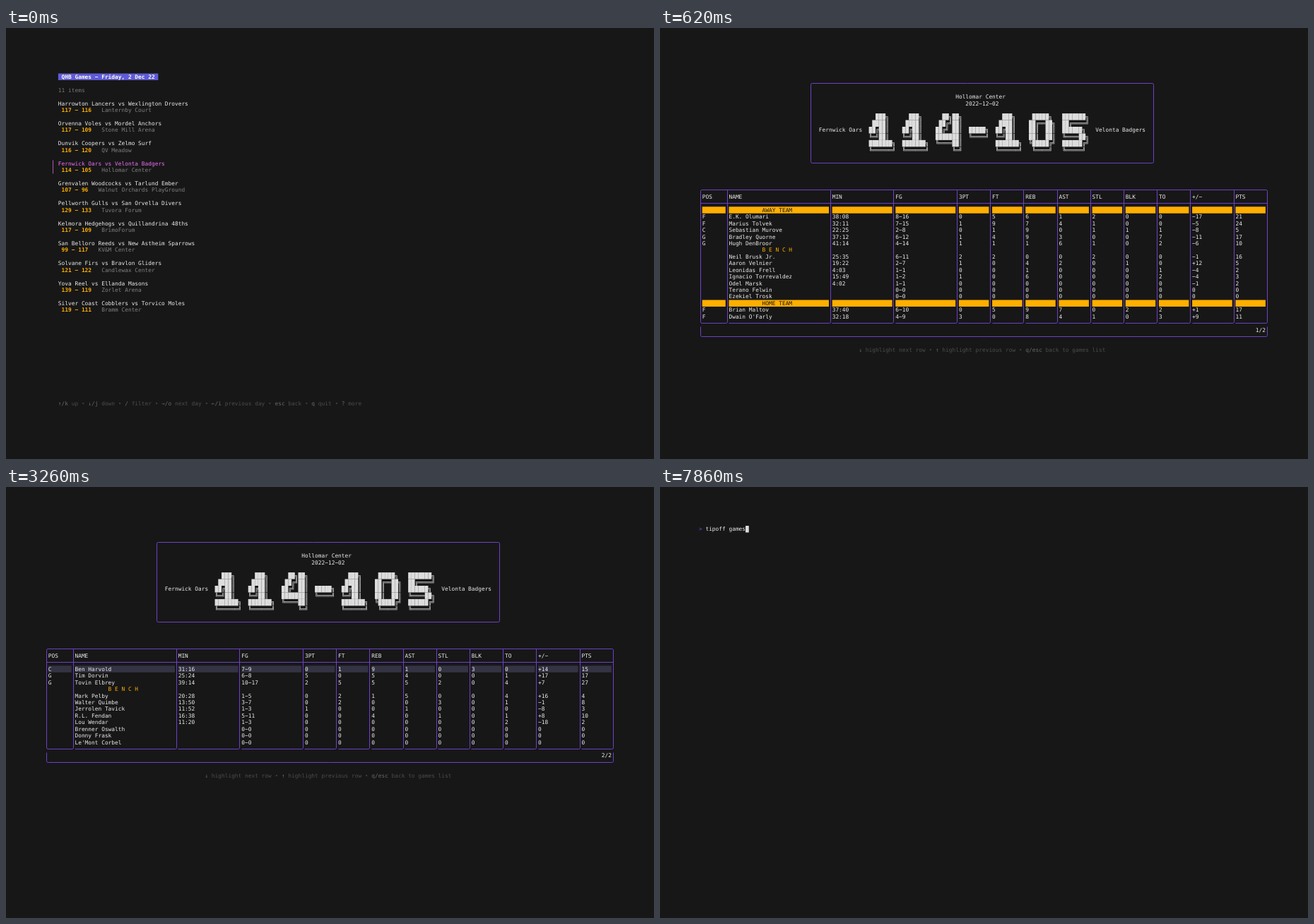
An HTML page with a canvas for the animation above (8000 ms loop, 917 by 611 pixels).

```html
<!DOCTYPE html>
<html lang="en">
<head>
<meta charset="utf-8">
<title>Terminal scoreboard</title>
<style>
html, body { margin: 0; width: 100%; height: 100%; overflow: hidden; background: #171717; }
canvas { display: block; }
</style>
</head>
<body>
<canvas id="stage" width="917" height="611"></canvas>
<script>
const ctx = document.getElementById('stage').getContext('2d');
const LOOP = 8000, ORIGIN = 55, CELL_W = 4.717, CELL_H = 9.444;
const FONT = '7.835px "DejaVu Sans Mono", "Liberation Mono", monospace';
const BG = '#171717', TEXT = '#ececec', LIGHT = '#dddddd', AMBER = '#ffaf00', PURPLE = '#6d41c8';
const KEY = '#686868', HINT = '#4c4c4c', DOT = '#404040';

const games = `Harrowton Lancers vs Wexlington Drovers|117 - 116|Lanternby Court
Orvenna Voles vs Mordel Anchors|117 - 109|Stone Mill Arena
Dunvik Coopers vs Zelmo Surf|116 - 120|QV Meadow
Fernwick Oars vs Velonta Badgers|114 - 105|Hollomar Center
Grenvalen Woodcocks vs Tarlund Ember|107 - 96|Walnut Orchards PlayGround
Pellworth Gulls vs San Orvella Divers|129 - 133|Tuvora Forum
Kelmora Hedgehogs vs Quillandrina 48ths|117 - 109|BrimoForum
San Belloro Reeds vs New Astheim Sparrows|99 - 117|KV&M Center
Solvane Firs vs Bravlon Gliders|121 - 122|Candlewax Center
Yova Reel vs Ellanda Masons|139 - 119|Zorlet Arena
Silver Coast Cobblers vs Torvico Moles|119 - 111|Bramm Center`.split('\n').map(g => g.split('|'));

// Position, name, then the stats; single-field lines are section headings.
const parsePage = text => text.split('\n').map(row => {
  const [pos, name, stats] = row.split('|');
  return name ? [pos, name, ...stats.replace('_', '').split(' ')] : pos;
});
const pages = [`AWAY TEAM
F|E.K. Olumari|38:08 8-16 0 5 6 1 2 0 0 -17 21
F|Marius Tolvek|32:11 7-15 1 9 7 4 1 0 0 -5 24
C|Sebastian Murove|22:25 2-8 0 1 9 0 1 1 1 -8 5
G|Bradley Quorne|37:12 6-12 1 4 9 3 0 0 7 -11 17
G|Hugh DenBroor|41:14 4-14 1 1 1 6 1 0 2 -6 10
B E N C H
|Neil Brusk Jr.|25:35 6-11 2 2 0 0 2 0 0 -1 16
|Aaron Velnier|19:22 2-7 1 0 4 2 0 1 0 +12 5
|Leonidas Frell|4:03 1-1 0 0 1 0 0 0 1 -4 2
|Ignacio Torrevaldez|15:49 1-2 1 0 6 0 0 0 2 -4 3
|Odel Marsk|4:02 1-1 0 0 0 0 0 0 0 -1 2
|Terano Felwin|_ 0-0 0 0 0 0 0 0 0 0 0
|Ezekiel Trosk|_ 0-0 0 0 0 0 0 0 0 0 0
HOME TEAM
F|Brian Maltov|37:40 6-10 0 5 9 7 0 2 2 +1 17
F|Dwain O'Farly|32:18 4-9 3 0 8 4 1 0 3 +9 11`,
`C|Ben Harvold|31:16 7-9 0 1 9 1 0 3 0 +14 15
G|Tim Dorvin|25:24 6-8 5 0 5 4 0 0 1 +17 17
G|Tovin Elbrey|39:14 10-17 2 5 5 5 2 0 4 +7 27
B E N C H
|Mark Pelby|20:28 1-5 0 2 1 5 0 0 4 +16 4
|Walter Quimbe|13:50 3-7 0 2 0 0 3 0 1 -1 8
|Jerrolen Tavick|11:52 1-3 1 0 0 1 0 0 0 -8 3
|R.L. Fendan|16:38 5-11 0 0 4 0 1 0 1 +8 10
|Lou Wendar|11:20 1-3 0 0 0 0 0 0 2 -18 2
|Brenner Oswalth|_ 0-0 0 0 0 0 0 0 0 0 0
|Donny Frask|_ 0-0 0 0 0 0 0 0 0 0 0
|Le'Mont Corbel|_ 0-0 0 0 0 0 0 0 0 0 0`].map(parsePage);

const heads = 'POS NAME MIN FG 3PT FT REB AST STL BLK TO +/- PTS'.split(' ');
const edges = [0, 8, 39, 58, 77, 87, 97, 107, 117, 127, 137, 147, 160, 170];

const bigGlyphs = {
  1: ['  ███╗', ' ████║', '██╔██║', '╚═╝██║', '███████╗', '╚══════╝'],
  4: ['  ██╗██╗', ' ██╔╝██║', '██╔╝ ██║', '███████║', '╚════██║', '     ╚═╝'],
  0: [' █████╗', '██╔══██╗', '██║  ██║', '██║  ██║', '╚█████╔╝', ' ╚════╝'],
  5: ['███████╗', '██╔════╝', '██████╗', '╚════██╗', '██████╔╝', '╚═════╝'],
  '-': ['', '', '█████╗', '╚════╝', '', '']
};

const X = col => ORIGIN + col * CELL_W;
const Y = row => ORIGIN + row * CELL_H;

function fill(col, row, cols, color) {
  ctx.fillStyle = color;
  ctx.fillRect(X(col), Y(row), cols * CELL_W, CELL_H);
}

// Writes one character per terminal cell.
function put(text, col, row, color = TEXT, bold = false) {
  ctx.font = (bold ? 'bold ' : '') + FONT;
  ctx.fillStyle = color;
  [...text.replace(/-/g, '−')].forEach((ch, i) => {
    if (ch === '█') ctx.fillRect(X(col + i), Y(row), CELL_W, CELL_H);
    else if (ch !== ' ') ctx.fillText(ch, X(col + i), Y(row) + 7.4);
  });
}

// Strokes a round-cornered polyline through cell centres.
function line(points, color = PURPLE) {
  const p = points.map(([c, r]) => [Math.floor(X(c + .5)) + .5, Math.floor(Y(r + .5)) + .5]);
  ctx.strokeStyle = color;
  ctx.beginPath();
  ctx.moveTo(...p[0]);
  for (let i = 1; i < p.length - 1; i++) ctx.arcTo(...p[i], ...p[i + 1], 2);
  ctx.lineTo(...p[p.length - 1]);
  ctx.stroke();
}

function help(text, col, row) {
  text.split(' • ').forEach((item, i) => {
    if (i) {
      put('•', col + 1, row, DOT);
      col += 3;
    }
    const gap = item.indexOf(' ');
    put(item.slice(0, gap), col, row, KEY);
    put(item.slice(gap), col + gap, row, HINT);
    col += item.length;
  });
}

function drawList() {
  fill(4, 1, 30, '#5f5bd8');
  put('QHB Games - Friday, 2 Dec 22', 5, 1, '#ffffe4', true);
  put('11 items', 4, 3, '#777777');
  games.forEach(([teams, score, venue], i) => {
    const row = 5 + i * 3, selected = i === 3;
    put(teams, 4, row, selected ? '#ee6ff8' : TEXT);
    put(score, 5, row + 1, AMBER, true);
    put(venue, 8 + score.length, row + 1, '#808080');
    if (selected) line([[2, row - .5], [2, row + 1.5]], '#ad58b4');
  });
  help('↑/k up • ↓/j down • / filter • →/o next day • ←/i previous day • esc back • q quit • ? more', 4, 50);
}

function drawScore() {
  line([[80, 2], [136, 2], [136, 14], [33, 14], [33, 2], [80, 2]]);
  put('Hollomar Center', 77, 4);
  put('2022-12-02', 80, 5);
  put('Fernwick Oars', 36, 9);
  put('Velonta Badgers', 119, 9);
  let col = 51;
  for (const ch of '114-105') {
    bigGlyphs[ch].forEach((part, i) => put(part, col, 7 + i, LIGHT));
    col += ch === '-' ? 8 : 10;
  }
}

function drawTable(page, selected, closed) {
  const rows = pages[page], top = 18, bottom = 21 + rows.length;
  const fillCells = (row, color) => edges.slice(1).forEach((e, i) =>
    fill(edges[i] + 1, row, e - edges[i] - 1, color));

  heads.forEach((head, i) => put(head, edges[i] + 1, 19));
  rows.forEach((cells, i) => {
    const row = 21 + i;
    if (typeof cells === 'string') {
      const team = cells.endsWith('TEAM');
      if (team) fillCells(row, AMBER);
      put(cells, 19, row, team ? BG : AMBER);
      return;
    }
    if (i === selected) fillCells(row, '#333344');
    cells.forEach((cell, k) => put(cell, edges[k] + 1, row));
  });

  const frame = [[.5, bottom], [0, bottom], [0, top], [170, top]];
  line(closed ? [...frame, [170, bottom], [160.5, bottom]] : [...frame, [170, bottom - .5]]);
  line([[0, 20], [170, 20]]);
  edges.slice(1, -1).forEach((e, i) =>
    line(closed ? [[e, top], [e, bottom], [edges[i] + .5, bottom]] : [[e, top], [e, bottom - .5]]));
  if (closed) {
    line([[0, bottom + .5], [0, bottom + 2], [170, bottom + 2], [170, bottom + .5]]);
    put(`${page + 1}/2`, 167, bottom + 1);
  }
  return bottom;
}

function drawGame(t) {
  drawScore();
  const page = t < 3260 ? 0 : 1;
  const selected = page || t < 1540 ? 0 : t < 2380 ? 1 : 2;
  const bottom = drawTable(page, selected, t >= 600);
  if (t >= 620) help('↓ highlight next row • ↑ highlight previous row • q/esc back to games list', 48, bottom + 4);
}

function drawPrompt(t) {
  const command = 'tipoff games';
  let col = 0;
  if (t >= 6260) {
    const typed = Math.min(command.length, 1 + Math.floor((t - 6260) / 50.9));
    put('>', 0, 0, '#5a56e0');
    put(command.slice(0, typed), 2, 0);
    col = 2 + typed;
  }
  const blinks = [6980, 7140, 7320, 7520, 7680, 7860].filter(b => t >= b).length;
  if (blinks % 2 === 0) fill(col, 0, 1, LIGHT);
}

function render(now) {
  const t = now % LOOP;
  ctx.fillStyle = BG;
  ctx.fillRect(0, 0, 917, 611);
  ctx.textRendering = 'geometricPrecision';
  ctx.lineWidth = 1;
  if (t < 560) drawList();
  else if (t >= 6240) drawPrompt(t);
  else if (t >= 580) drawGame(t);
}

const start = performance.now();
function tick() {
  render(performance.now() - start);
  requestAnimationFrame(tick);
}
tick();
</script>
</body>
</html>
```
